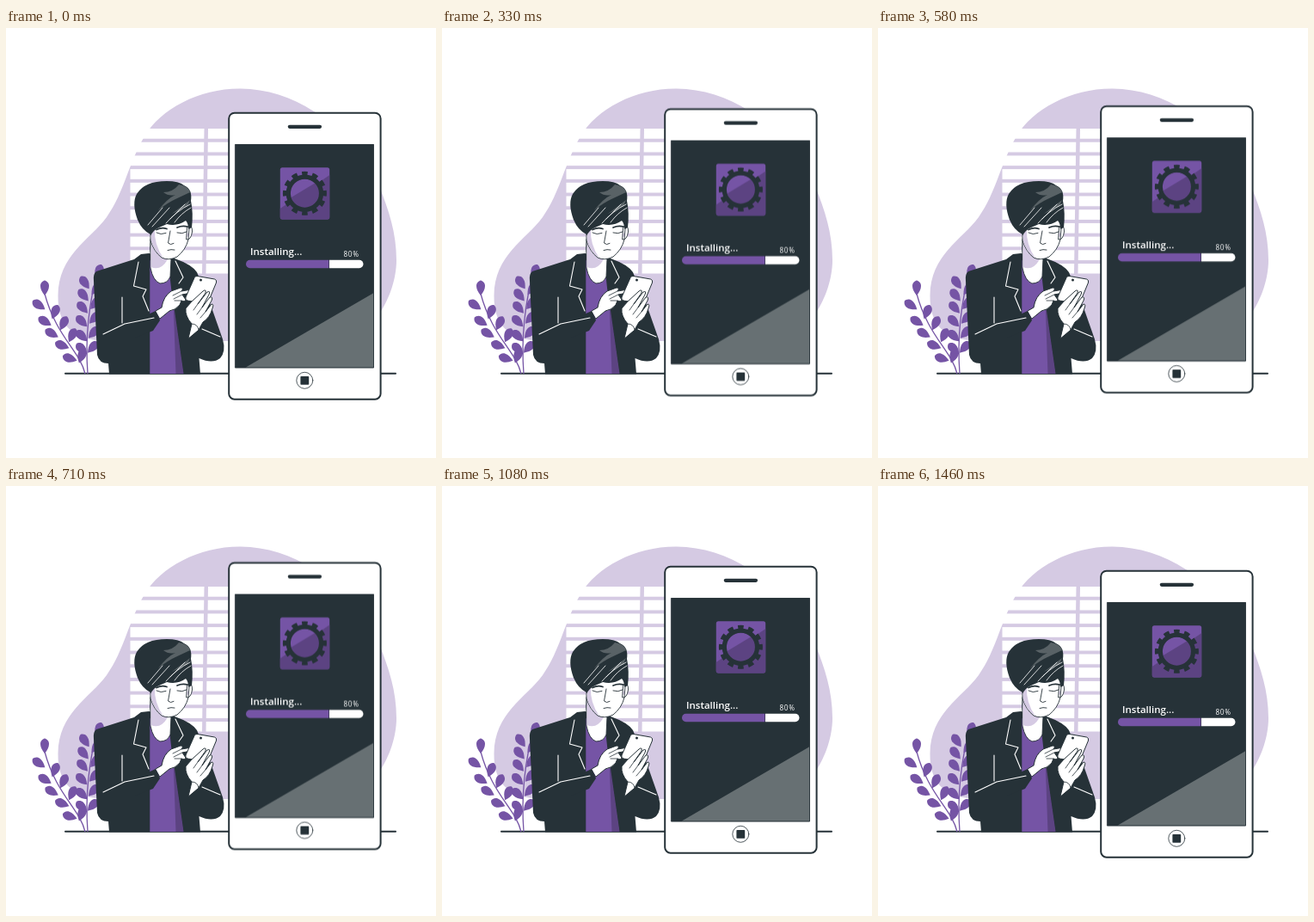
Recreate the animation shown at these times as an HTML page without scripts. Size 500 by 500 pixels, loop 1.5 s.

```html
<!DOCTYPE html>
<html lang="en">
<head>
<meta charset="utf-8">
<title>Installing</title>
<style>
  html, body { margin: 0; width: 100%; height: 100%; overflow: hidden; background: #fff; }
  svg { display: block; width: 100vw; height: 100vh; }
  .ink { fill: #263238; }
  .purple { fill: #7554a5; }
  .deep { fill: #5c4382; }
  .lilac { fill: #d5cae3; }
  .white { fill: #fff; }
  .line { fill: none; stroke: #263238; stroke-linecap: round; stroke-linejoin: round; }
  .chalk { fill: none; stroke: #fff; stroke-linecap: round; stroke-linejoin: round; }
  .skin { fill: #fff; stroke: #263238; stroke-linejoin: round; stroke-linecap: round; }
  .stem { fill: none; stroke: #7554a5; stroke-width: 1.3; }
  .gear { fill: none; stroke: #263238; }
  text { font-family: "Open Sans", sans-serif; fill: #fff; }

  /* The phone drifts up and back in even steps, 36 per loop. */
  .phone { animation: float 1500ms -5ms infinite; }
  @keyframes float {
    0% { transform: translateY(0); animation-timing-function: steps(18, jump-none); }
    50% { transform: translateY(-9.47px); animation-timing-function: steps(18, jump-none); }
    100% { transform: translateY(0); }
  }
</style>
</head>
<body>
<svg viewBox="0 0 500 500">
  <defs>
    <path id="leaf" d="M0 9C-3 5-5 2-5-2C-5-6-2-8 0-8.500C2-8 5-6 5-2C5 2 3 5 0 9Z"/>
    <pattern id="slats" y="117" width="10" height="15.700" patternUnits="userSpaceOnUse">
      <rect class="white" width="10" height="11.700"/>
    </pattern>
    <clipPath id="icon"><rect x="318.800" y="162.300" width="57.400" height="60.200" rx="2.500"/></clipPath>
    <clipPath id="bar"><rect x="279" y="269.800" width="136.500" height="9.400" rx="4.600"/></clipPath>
  </defs>

  <!-- Backdrop -->
  <path class="lilac" d="M273 70.500C225 70 180 94 161 126C142 158 138 190 117 220C97 247 61 264 60.500 311C60 350 82 364 122 364H385C423 364 454 312 454 270C454 238 445 212 434 184C416 137 382 109 358 97C332 80 303 71 273 70.500Z"/>
  <rect x="144.500" y="117" width="130" height="168.700" fill="url(#slats)"/>
  <path class="lilac" d="M230.500 117H235L232.500 286H228Z"/>
  <path class="line" stroke-width="2" d="M69 401.800H453"/>

  <!-- Plants -->
  <g class="purple">
    <path class="stem" d="M92 402C86 376 58 358 45 309M95 402C92 362 96 318 107 284"/>
    <use href="#leaf" transform="translate(45 302)"/>
    <use href="#leaf" transform="translate(38 322) rotate(-55)"/>
    <use href="#leaf" transform="translate(45 341) rotate(-58)"/>
    <use href="#leaf" transform="translate(53 355) rotate(-60)"/>
    <use href="#leaf" transform="translate(65 369) rotate(-68)"/>
    <use href="#leaf" transform="translate(74 384) rotate(-72)"/>
    <use href="#leaf" transform="translate(57 330) rotate(22)"/>
    <use href="#leaf" transform="translate(67 343) rotate(25)"/>
    <use href="#leaf" transform="translate(77 357) rotate(25)"/>
    <use href="#leaf" transform="translate(88 381) rotate(20)"/>
    <use href="#leaf" transform="translate(108 283) rotate(20)"/>
    <use href="#leaf" transform="translate(91.500 296) rotate(-35)"/>
    <use href="#leaf" transform="translate(90 310.500) rotate(-40)"/>
    <use href="#leaf" transform="translate(89 325) rotate(-42)"/>
    <use href="#leaf" transform="translate(88 341) rotate(-45)"/>
    <use href="#leaf" transform="translate(88 358) rotate(-45)"/>
    <use href="#leaf" transform="translate(88 373) rotate(-45)"/>
    <use href="#leaf" transform="translate(105 303) rotate(38)"/>
    <use href="#leaf" transform="translate(104 320) rotate(40)"/>
    <use href="#leaf" transform="translate(103 337) rotate(42)"/>
    <use href="#leaf" transform="translate(102 354) rotate(42)"/>
    <use href="#leaf" transform="translate(101 371) rotate(42)"/>
  </g>

  <!-- Jacket and shirt -->
  <path class="ink" d="M166 262L157 263L149 269L105 283Q101 286 102 294L106 380Q108 390 119 390L120 402.500H226L224.500 384Q240 391 249 384Q256 376 252 362L239 325L222 284Q216 275 196 268Z"/>
  <path class="purple" d="M167.300 270L190 284L194 320L206 402H167.300Z"/>
  <path class="deep" d="M194.500 318L197.500 402H206.500Z"/>
  <path class="ink" d="M150 340L174 329L179 340L171 352L150 360Z"/>
  <path class="skin" stroke-width=".9" d="M168 246V279Q171 294 179 297Q188 297 191 289L192 268Z"/>
  <path class="lilac" d="M168.500 250V278Q180 283 188 269L178 262Z"/>
  <path class="chalk" stroke-width="1.100" d="M154 272L148.500 300L163 304L159 312L166 329M197 271L206 290L201 297M135 313V343M113 356L138 344L172 337M228 350L249 359"/>

  <!-- Head -->
  <path class="skin" stroke-width=".9" d="M211 231Q217 228 216.500 237Q215 247 210 246ZM168 228L168 247Q172 260 181 267Q189 271 199 266Q209 258 212 246L214 220Z"/>
  <path class="lilac" d="M168.500 234H173Q172 252 183 267.500Q172 260 168.500 247Z"/>
  <path class="line" stroke-width=".9" d="M191 236L188.500 250Q191 253 195 250.500M188 258.500Q192 257 196 258M175 238Q180 241 186 238.500M199 238Q205 240 210 237"/>
  <path class="line" stroke-width="1.800" d="M175 234.500Q181 231.500 187 233.500M199 232Q205 229.500 211 231"/>
  <path class="ink" d="M167 264Q169 254 168 240Q158 235 153 223Q146 204 152 193Q161 178 187 178Q201 178 207 183Q217 187 215 201Q218 215 216 232L212 234Q212 227 209 224Q199 231 187 228L178 232Q171 235 168 242Z"/>
  <path fill="#596266" d="M183 191Q194 191 201 182Q212 184 214 191L197 199Q188 203 177 212Q188 198 197 194Q189 196 183 191ZM214 200L193 216L211 207Z"/>
  <path class="chalk" stroke-width=".8" d="M214 205Q198 213 186 227M215 209Q204 215 196 226M208 205L191 222M190 209L170 231M182 209L165 229"/>

  <!-- Hands and handset -->
  <path class="skin" stroke-width="1" d="M174 329L181 325Q183 312 192 306L203 302Q207 302 204 306L216 304Q219 306 215 308L205 310L209 316Q208 319 204 317L202 322Q197 328 190 329L179 338Z"/>
  <path class="line" stroke-width=".8" d="M204 306L194 311M205 310L195 315M204 317L196 317"/>
  <path class="skin" stroke-width="1" d="M222.500 288.500L242.500 292Q245.500 293 244.500 296L235 319Q234 321 231 320.500L211 317Q208 316 209 313L219 290.500Q220 288 222.500 288.500Z"/>
  <circle class="ink" cx="226.500" cy="293" r="1.500"/>
  <path class="skin" stroke-width="1" d="M212 361L216 344Q208 335 209 326L216 318L229 306Q233 303 232 308L223 321L234 307Q238 305 236 310L228 325L237 313Q241 312 239 317L232 330L239 321Q242 321 240 326Q237 337 229 342L224 351Z"/>
  <path class="line" stroke-width=".8" d="M223 321L218 328M228 325L222 333M232 330L226 337M216 344Q223 344 224 351"/>

  <!-- Large phone -->
  <g class="phone">
    <rect class="skin" x="259.200" y="98.700" width="176.400" height="333" rx="6.500" stroke-width="2"/>
    <path class="line" stroke-width="4.200" d="M329.800 114.800H365"/>
    <rect class="ink" x="266.500" y="135.200" width="161.200" height="260"/>
    <path fill="#677073" d="M427.200 308.300V394.700H278.500Z"/>
    <rect class="line" x="266.800" y="135.500" width="160.700" height="259.500" stroke-width=".8"/>
    <g clip-path="url(#icon)">
      <path class="purple" d="M318 162H377V223H318Z"/>
      <path class="deep" d="M377 170.500V223H318V210.500Z"/>
      <circle class="deep" cx="347.400" cy="192.200" r="17"/>
      <path class="purple" d="M331.600 197A16.500 16.500 0 0 1 359 180.500Z"/>
      <circle class="gear" cx="347.400" cy="192.200" r="19.100" stroke-width="5.200"/>
      <circle class="gear" cx="347.400" cy="192.200" r="23" stroke-width="5" pathLength="24" stroke-dasharray="1.100 .9" stroke-dashoffset=".55"/>
    </g>
    <text x="284" y="264.200" font-size="11.500" font-weight="600" textLength="auto">Installing...</text>
    <text x="392.400" y="265.500" font-size="8.200" letter-spacing=".7">80%</text>
    <g clip-path="url(#bar)">
      <path class="white" d="M376 269H416V280H376Z"/>
      <path class="purple" d="M279 269H375.400V280H279Z"/>
    </g>
    <circle class="line" cx="347.300" cy="409.800" r="9.500" stroke-width=".8"/>
    <rect class="ink" x="342.400" y="405" width="9.800" height="9.800" rx=".8"/>
  </g>
</svg>
</body>
</html>
```
